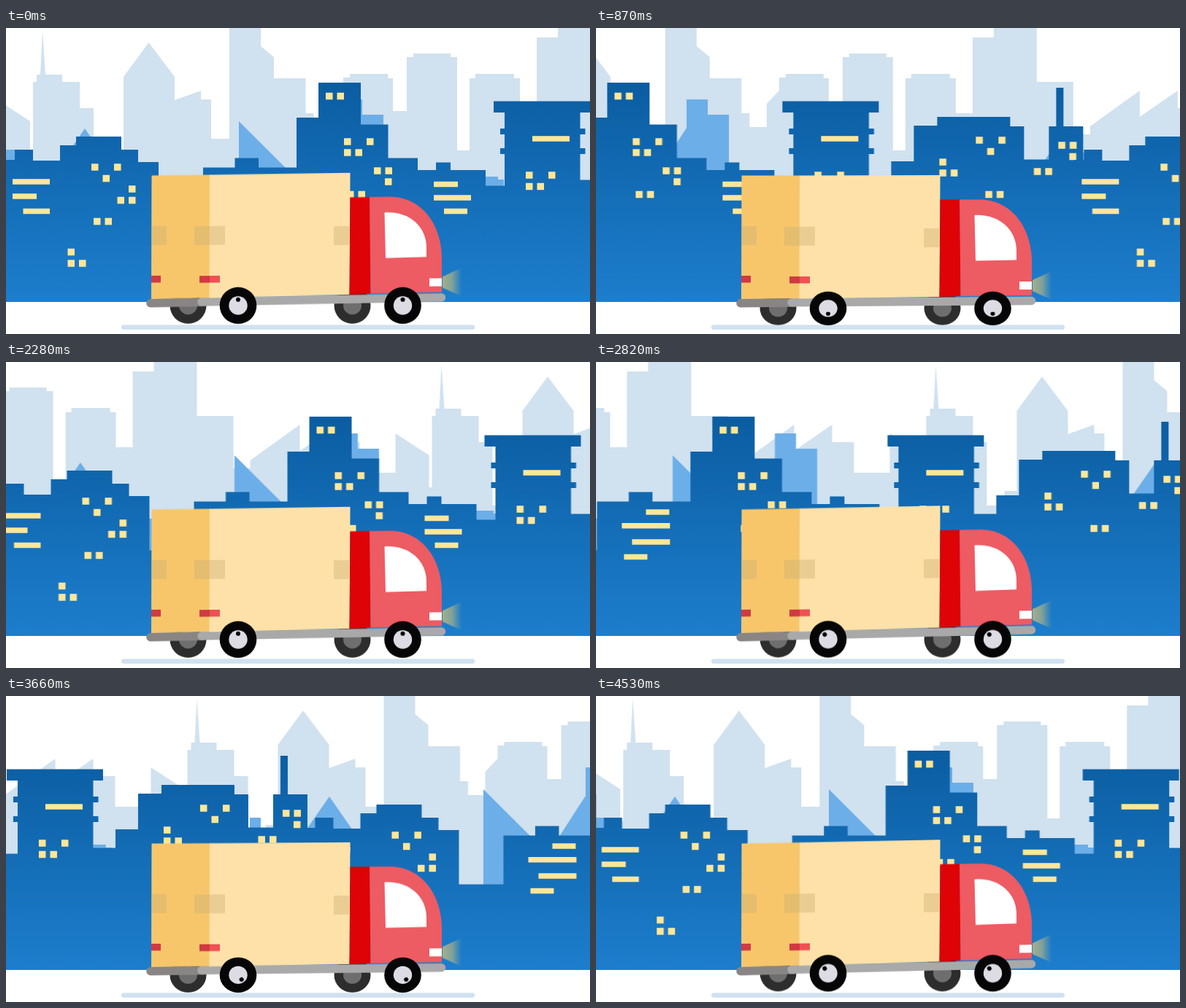
Animation of 800 by 420 pixels, one loop 4560 ms. Source, as an HTML page without scripts:

```html
<!DOCTYPE html>
<html lang="en">
<head>
<meta charset="utf-8">
<title>Delivery truck</title>
<style>
  html, body { margin: 0; width: 100%; height: 100%; overflow: hidden; background: #fff; }
  svg { display: block; width: 800px; height: 420px; }

  /* Skyline layers scroll at their own speeds and cut back at the loop */
  .layer { animation: scroll 4560ms steps(152) infinite; }
  .far { --run: -1107px; fill: #d0e1ef; }
  .mid { --run: -1755.6px; fill: #6caee8; }
  .near { --run: -2163px; }
  @keyframes scroll { to { transform: translateX(var(--run)); } }

  .square, .bar { fill: none; stroke: #ffe699; stroke-width: 9.5; }
  .bar { stroke-width: 7.5; }

  .body { transform-origin: 199px 372px; animation: rock 570ms linear infinite; }
  @keyframes rock {
    0% { transform: skewY(-.66deg); }
    42.1% { transform: skewY(-.24deg); }
    52.63% { transform: skewY(0deg); }
    94.74%, 100% { transform: skewY(-.96deg); }
  }

  .wheel { animation: bounce 570ms linear infinite; }
  @keyframes bounce {
    0% { transform: translateY(380.8px); }
    42.1% { transform: translateY(382.9px) scaleY(.96); }
    52.63% { transform: translateY(384.8px) scaleY(.92); }
    94.74%, 100% { transform: translateY(380.5px); }
  }

  .dot { animation: spin 570ms steps(19) infinite; }
  @keyframes spin { to { transform: rotate(342deg); } }
</style>
</head>
<body>
<svg viewBox="0 0 800 420">
  <defs>
    <linearGradient id="dusk" gradientUnits="userSpaceOnUse" x1="0" y1="75" x2="0" y2="376">
      <stop stop-color="#0b5da1"/>
      <stop offset="1" stop-color="#1d7ecd"/>
    </linearGradient>
    <linearGradient id="glow">
      <stop stop-color="#b5b581" stop-opacity=".9"/>
      <stop offset=".5" stop-color="#b5b581" stop-opacity=".65"/>
      <stop offset="1" stop-color="#b5b581" stop-opacity="0"/>
    </linearGradient>
    <filter id="soft" x="-1%" y="-2%" width="102%" height="104%">
      <feGaussianBlur stdDeviation=".7"/>
    </filter>

    <path id="farCity" d="M-13 262V98L33 128V172H37V74H42V64H47L50 3L54 64H77V74H101V110H120V197H134V190H144V177H161
      V67L195.500 20L231 67V99L267 86V98H281V152H306V-5H349V25L367 40V69H410.500V117H421.500V136H445V104L462 86V68H471V63H523V69H530V114
      H549V40H558V35H609V40H618V168H635V69H643V63H696V69H704V117H727V13H756V-5H815V74H865V146H888V135L956 86
      V122L1008 86V110H1038V152H1087V262Z"/>

    <g id="midCity">
      <path d="M-320 220V167H-305V220ZM-254 200L-211 138L-168 200ZM-125 262V215H-80V262Z"/>
      <path d="M0 262V128L64 192V262ZM98 202L140 137V98H169V119H198V202ZM320 230V204H355V208H363V230Z"/>
    </g>

    <g id="nearCity">
      <path fill="url(#dusk)" d="M-1 376V181H12V167H37V182H74V161H96V149H158V167H181V184H209V258.500H270V191.500H313.500V178.500H346V191.500
        H398V123H428V75H486V132.500H523.500V178.500H564V195H589V184.500H609V195H657V216.500H683V173H677V165H683V146H677V138H683V116H668V100.500
        H800V116H786.500V138H793.500V146H786.500V165H793.500V173H786.500V208.500H817V183H848V134H880V122H980V135H999V180.500H1033V135H1043V82H1053V135H1080V376Z"/>
      <path class="square" d="M117 191h9.500m21.500 0h9.500M132.500 206.500h9.500M168 221h9.500M152.500 236.500h9.500m6 0h9.500M120 265.500h9.500m6 0h9.500M84.500 307.500h9.500M84.500 323h9.500m6 0h9.500"/>
      <path class="bar" d="M9 211h51M9 231h33M23.500 251.500h36.500M337 206h32M304 224.700h66M318 247h52M307 267.500h32"/>
      <path class="square" d="M438 93.500h9.500m6 0h9.500M463 156h9.500m21.500 0h9.500M463 171h9.500m6 0h9.500M504 196h9.500m6 0h9.500M519 211h9.500M467 228.500h9.500m6 0h9.500"/>
      <path class="bar" d="M586 214.500h33M586 233h51M600 251.500h32M721 152h51"/>
      <path class="square" d="M712 202h9.500m21.500 0h9.500M712 217.500h9.500m6 0h9.500M933 154h9.500m21.500 0h9.500M948.500 169.500h9.500M883 184h9.500M883 199h9.500m6 0h9.500M946 228.500h9.500m6 0h9.500"/>
      <path class="square" d="M1046 161h9.500m6 0h9.500M1061 176.500h9.500M1012.500 197h9.500m6 0h9.500"/>
    </g>

    <g id="backWheel">
      <circle r="25" fill="#2d2d2d"/>
      <circle r="12.500" fill="#6e6e6e"/>
    </g>
    <g id="frontWheel">
      <circle r="25.300" fill="#060606"/>
      <circle r="12.700" fill="#dddce5"/>
    </g>
  </defs>

  <g filter="url(#soft)">
    <g class="layer far">
      <use href="#farCity"/>
      <use href="#farCity" x="1100"/>
    </g>
  </g>
  <g class="layer mid">
    <use href="#midCity" x="319"/>
    <use href="#midCity" x="1190.700"/>
    <use href="#midCity" x="2063"/>
  </g>
  <g class="layer near">
    <use href="#nearCity"/>
    <use href="#nearCity" x="1069"/>
    <use href="#nearCity" x="2147.500"/>
    <path fill="url(#dusk)" d="M2140 181h9v195h-9z"/>
  </g>

  <rect x="158" y="407.500" width="484" height="6.500" rx="3.250" fill="#d0e1f0"/>

  <g class="wheel">
    <use href="#backWheel" x="249.500"/>
    <use href="#backWheel" x="474.500"/>
  </g>

  <g class="body">
    <path d="M598 346L624 334V373L598 361Z" fill="url(#glow)"/>
    <g fill="none" stroke-width="11.500" stroke-linecap="round">
      <path d="M198 377.700L270 377" stroke="#898585"/>
      <path d="M268 376.700L596.500 374.500" stroke="#a9a9a9"/>
    </g>
    <path d="M199.500 202.500H280L279 371L199 372Z" fill="#f7c66b"/>
    <path d="M279 202.500L471.500 202L470.500 369L278.500 371.500Z" fill="#fee1a8"/>
    <path d="M199.500 272h20.500v26h-20.500zM258 272.700h42v26h-42zM449 275h21.500v26h-21.500z" fill="#c9b073" opacity=".4"/>
    <path d="M199 340h13v9.500h-13zM265 341h14v9.500h-14z" fill="#d03a42"/>
    <path d="M279 341h14v9.500h-14z" fill="#f05052"/>
    <path d="M471.500 235.500H498.500L499.500 368L470.500 369Z" fill="#dd0307"/>
    <path d="M498 235.500H525C570 235.500 597 275 597 322V367L499.500 368Z" fill="#ed5b63"/>
    <path d="M518.500 257C551 255 576 276 576 306V318.500L520 319.500Z" fill="#fff"/>
    <path d="M580 348h17v11h-17z" fill="#fff"/>
  </g>

  <g class="wheel">
    <use href="#frontWheel" x="318"/>
    <use href="#frontWheel" x="543.500"/>
    <g transform="translate(318)"><circle class="dot" cy="-8" r="3"/></g>
    <g transform="translate(543.500)"><circle class="dot" cy="-8" r="3"/></g>
  </g>
</svg>
</body>
</html>
```
